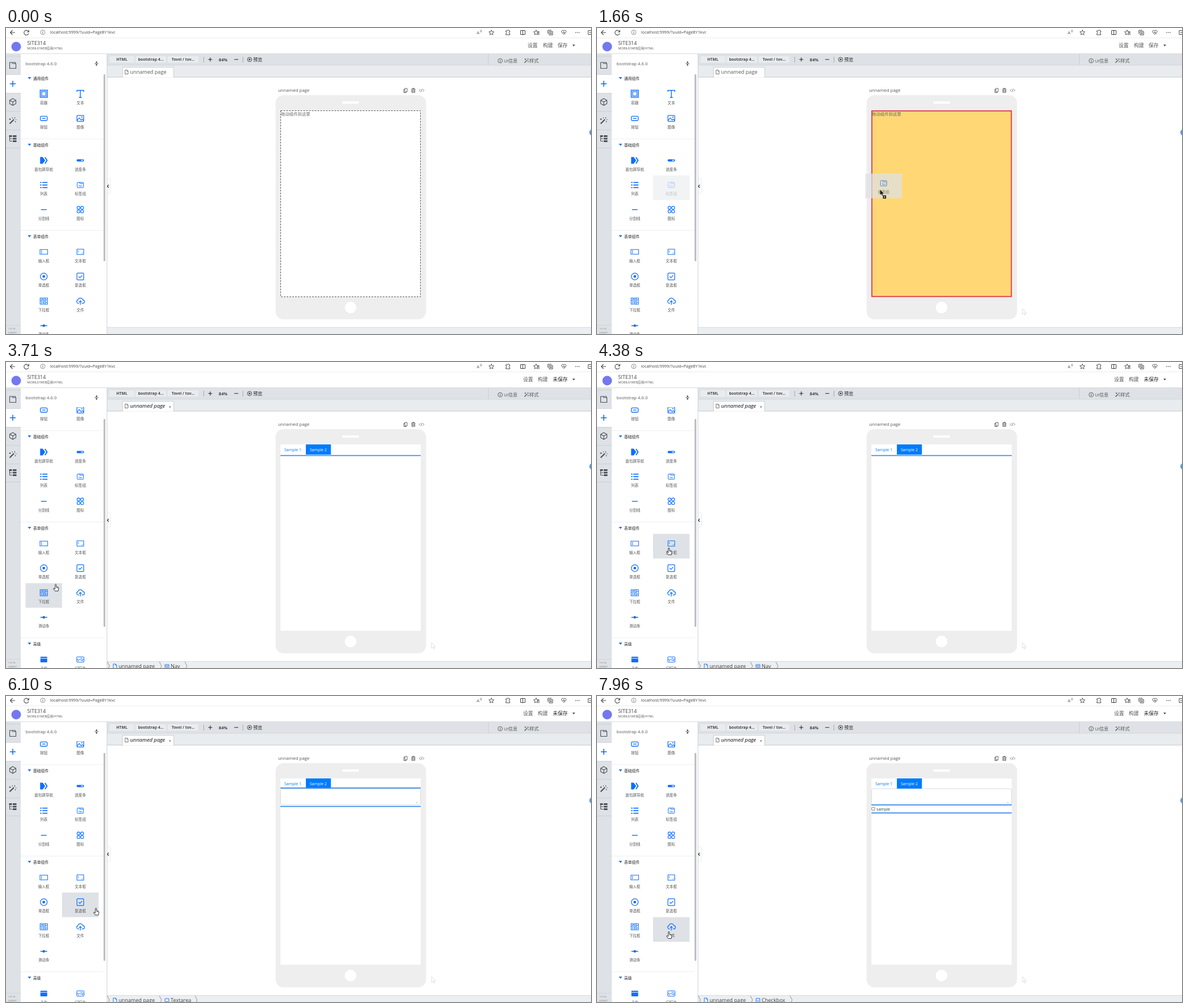
An HTML page that plays this animation: 1034x542 px, repeating every 8 s.

```html
<!DOCTYPE html>
<html lang="zh">
<head>
<meta charset="utf-8">
<title>Page builder</title>
<style>
html, body { margin: 0; width: 100%; height: 100%; overflow: hidden; background: #fff; }
svg { display: block; width: 100vw; height: 100vh; }
text { font-family: 'Open Sans', 'Noto Sans CJK SC', 'Noto Sans CJK', sans-serif; white-space: pre; }
</style>
</head>
<body>
<svg id="stage" viewBox="0 0 1034 542" xmlns="http://www.w3.org/2000/svg"></svg>
<script>
const LOOP = 8000, BLUE = '#0d6efd', SELECT = '#3d8bec', GREY = '#495057';

const rect = (x, y, w, h, fill, more = '') =>
  `<rect x="${x}" y="${y}" width="${w}" height="${h}" fill="${fill}" ${more}/>`;
const line = (d, color, width = 1, more = '') =>
  `<path d="${d}" fill="none" stroke="${color}" stroke-width="${width}" ${more}/>`;
const shape = (d, fill) => `<path d="${d}" fill="${fill}"/>`;
const circle = (x, y, r, fill, more = '') => `<circle cx="${x}" cy="${y}" r="${r}" fill="${fill}" ${more}/>`;
const text = (x, middle, size, str, fill = '#555', more = '') =>
  `<text x="${x}" y="${middle + size * .37}" font-size="${size}" fill="${fill}" ${more}>${str}</text>`;
const at = (x, y, body, more = '') => `<g transform="translate(${x} ${y})" ${more}>${body}</g>`;
const group = (id, body, more = '') => `<g id="${id}" ${more}>${body}</g>`;
const BOLD = ' font-weight="600"', ITALIC = 'font-style="italic"', MID = 'text-anchor="middle"';

const outline = (x, y, w, h, r = 0, sw = 1) =>
  rect(x, y, w, h, 'none', `rx="${r}" stroke="${BLUE}" stroke-width="${sw}"`);
const stroke = (d, sw = 1.2) => line(d, BLUE, sw);
const dot = (x, y, r) => circle(x, y, r, BLUE);

const icons = {
  container: outline(-6.5, -6.5, 13, 13, 0, 1.2) + outline(-3.5, -3.5, 7, 7) +
    line('M-5 -5H5V5H-5Z', BLUE, 1.4, 'stroke-dasharray="1 1"'),
  text: stroke('M-6 -3.5V-6H6V-3.5M0 -6V6.5M-2.5 6.5H2.5', 1.4),
  button: outline(-6, -3.7, 12, 7.6, 1.5, 1.3) + stroke('M-3 0H3', 1.4),
  image: outline(-6, -5.2, 12, 10.4, 1, 1.2) + stroke('M-6 4L-2 -1L1.5 3L3.5 1L6 4') + dot(2.8, -2.3, 1.1),
  crumb: shape('M-6.5 -6H-2L2.5 0L-2 6H-6.5Z', BLUE) + stroke('M2 -5.5L5.7 0L2 5.5', 1.9),
  progress: rect(-6.5, -2, 13, 4, BLUE, 'rx="2"') + rect(1, -.8, 4, 1.6, '#fff', 'rx=".8"'),
  list: [-4.5, 0, 4.5].map(y => stroke(`M-6.5 ${y}H-4M-2.5 ${y}H6.5`, 1.9)).join(''),
  tabs: outline(-5.5, -4.7, 11, 9.4, 1) + stroke('M-1 -4.7V-2.5H5.5', .9) + text(0, 1.3, 4, 'Tab', BLUE, MID + BOLD),
  divider: stroke('M-5 0H5', 1.4),
  icons: [-3.2, 3.2].map(x => [-3.2, 3.2].map(y =>
    circle(x, y, 2.6, 'none', `stroke="${BLUE}" stroke-width="1.1"`)).join('')).join(''),
  input: outline(-6.8, -4.2, 13.6, 8.4) + stroke('M-4 -2V2M-5 -2H-3M-5 2H-3', .8),
  textarea: outline(-6, -4.7, 12, 9.4) + stroke('M-3.5 -2.5V1M2.5 3.3L4.8 1', .9),
  radio: circle(0, 0, 6, 'none', `stroke="${BLUE}" stroke-width="1.2"`) + dot(0, 0, 2.4),
  checkbox: outline(-6, -6, 12, 12, 1, 1.2) + stroke('M-3 0L-.8 2.3L3.2 -2', 1.3),
  select: outline(-6.5, -5.5, 13, 11) + stroke('M2.5 -5.5V5.5M-6.5 -1H2.5', 1) +
    stroke('M-5 -3.3H1M-5 1.2H-3M-2 1.2H1M-5 3.4H-3M-2 3.4H1', 1.2) + shape('M3.2 -3H6L4.6 -.8ZM3.2 3H6L4.6 .8Z', BLUE),
  file: stroke('M-2.5 4H-4A3 3 0 0 1 -4.4 -1.8A4.5 4.5 0 0 1 4.3 -2A3 3 0 0 1 4.2 4H2.5', 1.2) +
    stroke('M0 6.5V-.3M-2.4 2L0 -.5L2.4 2', 1.2),
  slider: stroke('M-6 0H6', 1.5) + dot(0, 0, 2.3),
  card: rect(-6, -5, 12, 10, BLUE, 'rx="1"') + rect(-6, -2.7, 12, 1, '#fff'),
  slides: outline(-6.5, -4.7, 13, 9.4, 1) + stroke('M-4 3L-1 -1L1.5 2L3 .5L4.5 3M-4.5 -2V2M4.5 -2V2', .9) + dot(1.6, -2, .9),
};

const sections = [
  [89, '通用组件', 116.5, [['container', '容器'], ['text', '文本'], ['button', '按钮'], ['image', '图像']]],
  [207, '基础组件', 234.5, [['crumb', '面包屑导航'], ['progress', '进度条'], ['list', '列表'], ['tabs', '标签组'],
    ['divider', '分割线'], ['icons', '图标']]],
  [369, '表单组件', 396.5, [['input', '输入框'], ['textarea', '文本框'], ['radio', '单选框'], ['checkbox', '复选框'],
    ['select', '下拉框'], ['file', '文件'], ['slider', '滑动条']]],
  [574, '高级', 602, [['card', '卡片'], ['slides', '幻灯片']]],
];

const CELL_W = 64.6, CELL_H = 43.6, cells = [];
const panel = sections.map(([y, title, top, items], s) =>
  (s ? rect(26, y - 11, 147, 1, '#eef0f2') : '') +
  shape(`M38.5 ${y - 2}H44.5L41.5 ${y + 1.8}Z`, BLUE) + text(48, y, 6.8, title, '#222', 'font-weight="500"') +
  items.map(([id, label], i) => {
    const cell = { id, x: 34.5 + i % 2 * CELL_W, y: top - 17 + (i >> 1) * CELL_H };
    cells.push(cell);
    return at(cell.x, cell.y, rect(0, 0, CELL_W, CELL_H, 'none', `id="bg-${id}"`) +
      group('fade-' + id, group('cell-' + id, at(CELL_W / 2, 17, icons[id]) + text(CELL_W / 2, 32.6, 6.6, label, '#555', MID))));
  }).join('')).join('');

const page = 'M-2.6 -3.5H1L2.8 -1.6V3.5H-2.6ZM1 -3.5V-1.6H2.8';
const star = 'M0 -4.5L1.3 -1.5L4.5 -1.2L2 .9L2.8 4.1L0 2.4L-2.8 4.1L-2 .9L-4.5 -1.2L-1.3 -1.5Z';
const ink = (x, y, d, w = 1) => at(x, y, line(d, '#444', w));

const browser = rect(0, 17, 1034, 1, '#ececec') +
  ink(11.5, 8, 'M4.5 0H-4M0 -4L-4 0L0 4', 1.1) +
  ink(36, 8, 'M4 -1A4.2 4.2 0 1 0 4 1.6M4.3 -4.4V-1H1', 1.1) +
  circle(65, 7.7, 4, 'none', 'stroke="#777" stroke-width=".8"') + ink(65, 7.7, 'M0 -.7V2.2M0 -2.3V-1.3', .8) +
  text(78, 7.6, 7.35, 'localhost:9999/?uuid=Page8Y1kvc', '#444') +
  text(832, 8, 7.6, 'A', '#555') + line('M838 4Q840 5.5 838 7M839.5 3Q842 5.5 839.5 8', '#666', .7) +
  ink(858, 8, star, .9) +
  ink(887, 8, 'M-3.5 -3H-.8A1.4 1.4 0 0 1 2 -3H3.5V-.8A1.4 1.4 0 0 0 3.5 2V4H-3.5V1.8A1.4 1.4 0 0 0 -3.5 -1Z') +
  ink(913.5, 8, 'M-4 -3.5H4V3.5H-4ZM0 -4.5V4.5') +
  ink(937, 8, star, .9) + ink(941, 9, 'M-2 -2H2M-1 .3H2M0 2.6H2') +
  ink(962, 8, 'M-2 -1.8H4.2V4.2H-2ZM-4.2 2V-4H2.2M1.1 -.5V3M-.6 1.2H2.8') +
  ink(986, 8, 'M0 3.5L-3.6 -.2A2.2 2.2 0 0 1 0 -3A2.2 2.2 0 0 1 3.6 -.2ZM-2 0H-.8L.2 -1.4L1.3 1.5L2 0', .9) +
  [-3, 0, 3].map(x => circle(1010 + x, 8, .8, '#333')).join('') +
  ink(1032, 8, 'M4 -3.5H-3V3.5H4M-1 0H3');

const header = circle(18, 33, 8.5, '#7478f0') +
  text(37.5, 27, 9, 'SITE314', '#444') + text(37.5, 35.6, 5.6, 'MOBILE/WEB应用/HTML', '#555') +
  group('saved', text(922, 31, 8.9, '设置') + text(949, 31, 8.9, '构建') + text(975, 31, 8.9, '保存')) +
  group('unsaved', text(914, 31, 8.8, '设置') + text(940, 31, 8.8, '构建') + text(966.5, 31, 8.8, '未保存', '#222')) +
  shape('M1001 29.6H1006L1003.5 32.4Z', '#444') + rect(0, 45, 1034, 1, '#d9dcdf');

const rail = rect(0, 46, 26, 496, '#dee2e6') + rect(0, 82, 26, 33, '#fff') +
  [49.5, 82, 115, 147.5, 180, 212].map(y => rect(0, y, 26, .8, '#c8ccd1')).join('') +
  at(12, 66, line('M-5.5 5.5V-5H-1.5L0 -3H5.5V5.5ZM-1.5 -5H4.5V-3', GREY, 1.1)) +
  line('M12 93.5V104M6.8 98.7H17.2', BLUE, 1.6) +
  at(12, 131, line('M0 -6L5.5 -3V3L0 6L-5.5 3V-3ZM-5.5 -3L0 0L5.5 -3M0 0V6', GREY, 1.1)) +
  at(12, 164, line('M-5.5 5.5L2 -2', GREY, 2.2) + line('M3.5 -6V-3.5M5 -1.5H6.5M-1 -5.5L0 -4M4 1L5 3M-5 -4V-1M-6.5 -2.5H-3.5', GREY, 1.1)) +
  at(12, 196, line('M-5.5 -4.5V4.5H-1M-5.5 0H-1', GREY, 1) + rect(-6.5, -6, 5, 3, GREY) +
    [-6, -1.5, 3].map(y => rect(0, y, 6.5, 3, GREY)).join('')) +
  text(4, 532, 4.3, '1.0.16-', '#777') + text(4, 539.8, 4.3, '220207', '#777') + rect(0, 526, 26, .8, '#cfd3d7');

const sidebar = text(34.5, 63, 7.8, 'bootstrap 4.6.0') +
  at(160, 63, line('M-3.2 0H3.2M0 -4V-1.3M0 1.3V4', '#333', .9) + shape('M-1.7 -3H1.7L0 -1ZM-1.7 3H1.7L0 1Z', '#333')) +
  `<clipPath id="list"><rect x="26" y="80" width="146" height="462"/></clipPath>` +
  `<g clip-path="url(#list)">${group('panel', panel)}</g>` +
  rect(172.5, 82, 3, 331, '#b9bbbd', 'id="thumb" rx="1"') + rect(178, 46, 1, 496, '#ced2d6');

const chip = (x, w, label) => rect(x, 50, w, 11.5, '#e9ecef', 'rx="1.5"') +
  text(x + w / 2, 55.6, 6.85, label, '#444', MID + ' font-weight="700"');
const toolbar = rect(179, 46, 855, 20, '#dee2e6') +
  chip(183, 43.5, 'HTML') + chip(229, 54, 'bootstrap 4...') + chip(286, 54, 'Tovel / tov...') +
  rect(349, 51, .8, 10, '#999') + rect(418.5, 51, .8, 10, '#999') +
  line('M357.5 55.8H364.5M361 52.3V59.3M403.5 55.8H410.5', '#222', 1.1) +
  text(376, 55.7, 7.7, '84%', '#222', BOLD) +
  circle(430.5, 55.8, 3.8, 'none', 'stroke="#333" stroke-width=".9"') + shape('M429.3 53.8L432.8 55.8L429.3 57.8Z', '#333') +
  text(437, 56, 8, '预览', '#222') + rect(852, 46, .8, 20, '#c6cace') +
  circle(873.5, 58, 3.9, 'none', 'stroke="#555" stroke-width=".9"') + line('M873.5 57.2V60.3M873.5 55.5V56.4', '#555', 1) +
  text(880, 58, 8, 'UI信息') + line('M916.5 61.5L921 57', '#555', 1.5) +
  line('M922 53.8V55.5M923 58V61M918 54V56.5M916.5 55.3H919.5M922 57L924 54.5', '#555', .9) + text(925, 58, 8.4, '样式') +
  rect(179, 66, 855, 21, '#e9ecef') + rect(179, 65.6, 855, .8, '#cdd1d5') + rect(179, 86.5, 855, 1, '#c3c7cb') +
  `<path d="M206 87.6V69.5H296.5V87.6" fill="#fff" stroke="#c9cdd1"/>` + at(213, 78, line(page, '#555', .8)) +
  group('tabSaved', text(219.5, 78, 9.1, 'unnamed page')) +
  group('tabDirty', text(219.5, 78, 9.3, 'unnamed page', '#111', ITALIC) + circle(289.8, 79.5, 1, '#222'));

const phone = text(481, 110, 7.9, 'unnamed page') +
  at(706, 110.5, line('M-1 -3.5H3V2.5H-1ZM-1 -2H-2.8V4H1.2V2.5', '#555', .9)) +
  at(720, 110.5, line('M-3.4 -2.3H3.4M-1.2 -2.5V-3.7H1.2V-2.5M-2.6 -2V3.7H2.6V-2M-.9 -.7V2.3M.9 -.7V2.3', '#444', .9)) +
  at(734.5, 110.5, line('M-2 -2.3L-4.3 0L-2 2.3M2 -2.3L4.3 0L2 2.3M.8 -2.8L-.8 2.8', '#666', .8)) +
  rect(476.5, 119, 266, 397, '#eeeeee', 'rx="14"') + rect(594, 130, 30, 4, '#fff', 'rx="2"') + circle(609, 495, 10.3, '#fff') +
  rect(485, 146, 248, 330, '#fff', 'id="screen"') +
  group('empty', rect(485.5, 146.5, 247, 329.5, 'none', 'id="dash" stroke="#555" stroke-dasharray="3 2"') + text(486, 152.3, 7.4, '拖动组件到这里', '#666')) +
  group('frame', rect(485.8, 146.8, 246.6, 328.8, 'none', 'id="edge"')) +
  group('nav', text(492, 155, 7, 'Sample 1', '#007bff') + rect(530, 146, 44.3, 18, '#007bff') + text(537, 155, 7, 'Sample 2', '#fff')) +
  rect(485, 164.8, 248, 1.7, SELECT, 'id="navLine"') +
  group('area', rect(485.4, 164.4, 247.2, 28.2, '#fff', 'id="areaBox" stroke="#ced4da" stroke-width=".8" rx="2"') +
    line('M724.5 190L727 187.5M726 190L727 189', '#888', .6)) +
  group('areaLines', rect(485, 163, 248, 32.5, 'none', 'id="areaFill"') + rect(485, 162, 248, 1.8, SELECT) + rect(485, 194.7, 248, 1.8, SELECT)) +
  group('check', rect(485.7, 197.2, 5.2, 5.2, '#fff', 'stroke="#666" stroke-width=".8" rx=".8"') + text(494, 200.3, 7.1, 'sample', '#1f4a48') +
    rect(485, 192, 248, 1.8, SELECT) + rect(485, 206.3, 248, 1.8, SELECT));

const chevron = x => line(`M${x} 531L${x + 4} 538.5L${x} 546`, '#888', .9);
const crumb = (id, label, end, icon) => group(id, at(284.5, 538.8, icon) + text(291, 538.5, 9.2, label, '#444') + chevron(end));
const footer = rect(179, 530, 855, 12, '#eceff2') + rect(179, 529.8, 855, .9, '#d5d8db') +
  group('crumbs', chevron(179) + at(192.5, 538.8, line(page, BLUE, .8, 'transform="scale(1.1)"')) +
    text(199, 538.5, 9.1, 'unnamed page', '#444') + chevron(271) +
    crumb('crumb1', 'Nav', 316, outline(-3.5, -3, 7, 6, .5, .8) + stroke('M-3.5 -1H3.5M-2 1H2', .8)) +
    crumb('crumb2', 'Textarea', 334, outline(-3.5, -2.8, 7, 5.6, .5, .9)) +
    crumb('crumb3', 'Checkbox', 341, outline(-3.3, -3.3, 6.6, 6.6, .5, .9) + stroke('M-1.7 0L-.4 1.3L1.8 -1.1', .8)));

const handle = `<path d="M179 266L184.5 268.5V291.5L179 294Z" fill="#fff" stroke="#e2e4e6" stroke-width=".7"/>` +
  line('M181.6 277.6L179.2 280.2L181.6 282.8', '#222', 1.2);

const arrowPath = 'M0 0V10L2.3 8L4 11.5L5.6 10.8L4 7.4H7Z';
const arrow = `<path d="${arrowPath}" fill="#fff" stroke="#3d6a68" stroke-width=".8"/>`;
const hand = `<path d="M-1 1Q0 -.6 1 1V5L4.3 5.8Q5.5 6.2 5.3 7.6L4.4 12.5H-1.2L-4 8.6Q-4.2 7.2 -2.8 7.6L-1 9Z"
  fill="#fff" stroke="#222" stroke-width=".9"/>` + line('M1.8 5.2V7.4M3.6 5.7V7.6', '#222', .6);
const copyArrow = `<path d="${arrowPath}" fill="#111" stroke="#fff" stroke-width=".4"/>` +
  rect(5.2, 10.5, 5.6, 5.6, '#111') + line('M8 11.6V15M6.3 13.3H9.7', '#fff', .8);

document.getElementById('stage').innerHTML = rect(0, 0, 1034, 542, '#fff') + browser + header + rail + sidebar +
  toolbar + phone + footer + handle + circle(1037, 185, 6, '#5b9bea') +
  group('trail', at(752, 497, arrow), 'opacity=".25"') +
  group('ghost', rect(0, 0, CELL_W, CELL_H, '#dee2e6') + '<use id="ghostCell"/>', 'opacity=".73"') +
  group('cursor', group('arrow', arrow) + group('hand', hand) + group('copy', copyArrow));

const $ = id => document.getElementById(id);
const show = (id, on) => $(id).setAttribute('visibility', on ? 'inherit' : 'hidden');
const set = (id, name, value) => $(id).setAttribute(name, value);

// time, x, y of the pointer tip
const path = [
  [80, 938, 530], [150, 752, 497], [420, 560, 390], [640, 300, 345], [860, 112, 328], [910, 112, 325],
  [1190, 125, 287], [1420, 125, 287], [1660, 500, 286], [1900, 558, 287], [2320, 560, 287], [2650, 169, 370],
  [2900, 96, 418], [3080, 84, 411], [3180, 79, 408], [3600, 79, 408], [4180, 125, 331], [4380, 127, 329],
  [4510, 127, 329], [4700, 520, 325], [4800, 573, 323], [5150, 573, 323], [5720, 462, 340], [6150, 120, 380], [6400, 120, 380],
  [6560, 430, 353], [6660, 578, 336], [6800, 588, 331], [7050, 588, 331], [7400, 196, 362], [7650, 137, 405], [7960, 127, 417],
];
const drags = [
  { id: 'tabs', start: 1420, drop: 2000, dx: -26, dy: -28 },
  { id: 'textarea', start: 4510, drop: 4950, dx: -28, dy: -24 },
  { id: 'checkbox', start: 6400, drop: 6900, dx: -21, dy: -32 },
];

function pointer(t) {
  const i = path.findIndex(p => p[0] > t);
  if (i <= 0) return path[i ? path.length - 1 : 0].slice(1);
  const [a, b] = [path[i - 1], path[i]], k = (t - a[0]) / (b[0] - a[0]);
  return [a[1] + (b[1] - a[1]) * k, a[2] + (b[2] - a[2]) * k];
}

function draw(t) {
  const [x, y] = pointer(t);
  const k = Math.min(1, Math.max(0, (t - 3380) / 250)), ease = k * k * (3 - 2 * k), scroll = 75 * ease;
  const drag = drags.find(d => t >= d.start && t < d.drop);
  const dropped = drags.find(d => t >= d.drop && t < d.drop + 300);
  const step = drags.filter(d => t >= d.drop).length;
  const inPhone = t >= 80 && x >= 485 && x <= 733 && y >= 146 && y <= 476;
  const target = drag && inPhone;

  set('panel', 'transform', `translate(0 ${-scroll})`);
  set('thumb', 'y', 82 + 19 * ease);
  set('thumb', 'height', 331 + 37 * ease);

  for (const c of cells) {
    const held = drag && drag.id === c.id;
    const over = x >= c.x && x < c.x + CELL_W && y + scroll >= c.y && y + scroll < c.y + CELL_H && y > 80;
    const hover = t >= 7380 ? c.id === 'file' : !drag && (over || dropped && dropped.id === c.id);
    set('bg-' + c.id, 'fill', held ? '#f2f3f5' : hover ? '#dee2e6' : 'none');
    set('fade-' + c.id, 'opacity', held ? .3 : 1);
  }

  for (const id of ['saved', 'tabSaved', 'empty']) show(id, !step);
  for (const id of ['unsaved', 'tabDirty', 'crumbs', 'nav']) show(id, step);
  for (const n of [1, 2, 3]) $('crumb' + n).setAttribute('display', step === n ? 'inline' : 'none');
  $('dash').setAttribute('display', inPhone ? 'none' : 'inline');
  show('navLine', step === 1);
  show('area', step >= 2 && !target);
  show('areaLines', step === 2);
  set('areaFill', 'fill', target ? '#ffd875' : 'none');
  show('check', step === 3);
  set('screen', 'fill', target ? '#ffd875' : '#fff');
  show('frame', inPhone);
  set('edge', 'stroke', target ? '#dc3545' : SELECT);
  set('edge', 'stroke-width', target ? 1.8 : 1.2);

  show('ghost', drag);
  if (drag) {
    set('ghostCell', 'href', '#cell-' + drag.id);
    set('ghost', 'transform', `translate(${x + drag.dx} ${y + drag.dy})`);
  }
  const overList = x > 26 && x < 173 && y > 80;
  $('cursor').setAttribute('display', t >= 80 ? 'inline' : 'none');
  show('trail', t >= 150);
  show('copy', drag);
  show('hand', !drag && overList);
  show('arrow', !drag && !overList);
  set('cursor', 'transform', `translate(${x} ${y})`);
}

const began = performance.now();
function tick() {
  draw((performance.now() - began) % LOOP);
  requestAnimationFrame(tick);
}
tick();
</script>
</body>
</html>
```
